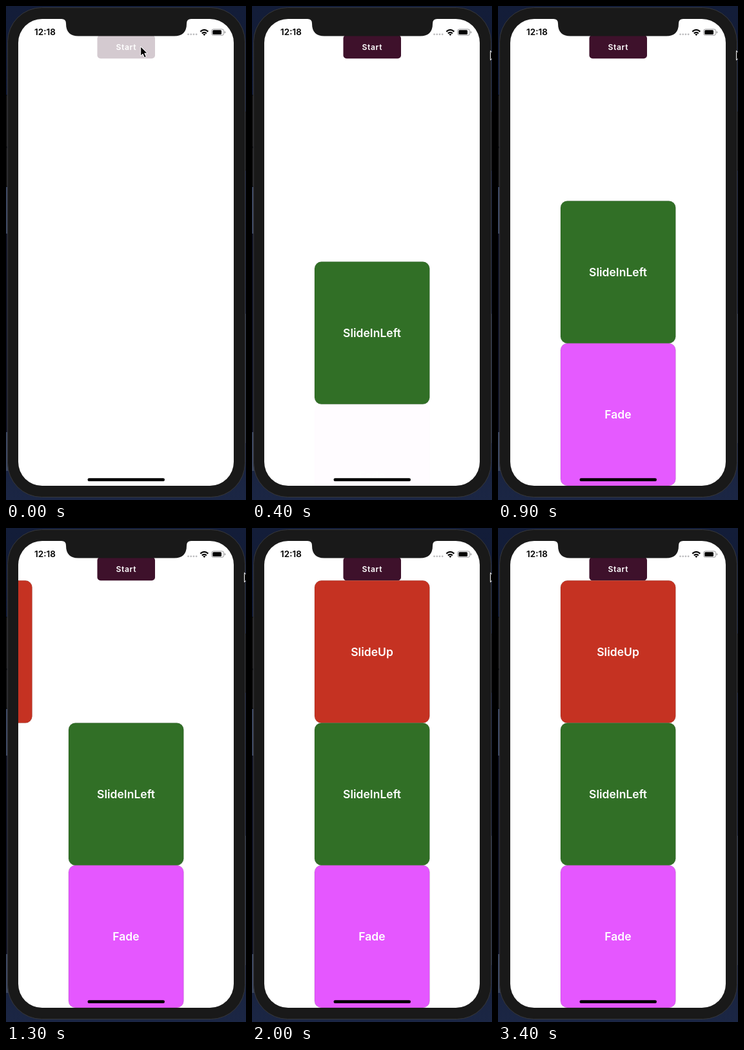
An HTML page for the animation above (3.5 s loop, 372 by 764 pixels).

```html
<!DOCTYPE html>
<html lang="en">
<head>
<meta charset="utf-8">
<title>Sequenced entrances</title>
<style>
  html, body { margin: 0; width: 100%; height: 100%; overflow: hidden; background: #131c35; }
  svg { display: block; width: 372px; height: 764px; }
  text { font-family: Inter, "Liberation Sans", sans-serif; font-weight: 600; text-anchor: middle; fill: #fff; }
  .card rect { stroke: #000; stroke-opacity: .25; stroke-width: .5; }
  .card text { font-size: 17.5px; }
</style>
</head>
<body>
<svg viewBox="0 0 372 764">
  <defs>
    <clipPath id="screenClip"><rect x="19" y="20" width="334" height="722" rx="37"/></clipPath>
    <linearGradient id="sky" x2="0" y2="1">
      <stop stop-color="#131d39"/>
      <stop offset=".6" stop-color="#111830"/>
      <stop offset="1" stop-color="#1b2644"/>
    </linearGradient>
  </defs>

  <rect width="372" height="764" fill="url(#sky)"/>
  <path d="M0 280h4v72h-4zM0 659h4v60h-4z" fill="#3b465f"/>
  <path d="M0 352h4v307h-4z" fill="#111426"/>
  <path d="M368 476h4v200h-4z" fill="#2b3448"/>
  <path d="M0 138h4v80h-4zM0 219h4v60h-4zM368 164h4v90h-4z" fill="#1d1d1e" stroke="#080808"/>
  <rect x="2.5" y="2.5" width="368" height="757" rx="53" fill="#191919" stroke="#37383c"/>

  <g clip-path="url(#screenClip)">
    <rect x="19" y="20" width="334" height="722" fill="#fff"/>
    <g id="button">
      <rect x="141.5" y="45" width="89.5" height="36.3" rx="5" fill="#3e112b"/>
      <text x="186.3" y="67.7" font-size="12.2" letter-spacing=".55">Start</text>
    </g>
    <g id="cards"></g>
  </g>

  <path d="M86 19h201v1q-7 0-7 7q0 19.500-19 19.500h-149q-19 0-19-19.500q0-7-7-7z" fill="#191919"/>
  <text x="60.5" y="45.300" font-size="13.500" style="fill:#000">12:18</text>
  <g fill="#bcbcbe">
    <circle cx="282.500" cy="43.800" r="1.400"/><circle cx="286.700" cy="43.800" r="1.400"/>
    <circle cx="290.900" cy="43.800" r="1.400"/><circle cx="295.100" cy="43.800" r="1.400"/>
  </g>
  <g fill="none" stroke="#000" stroke-width="2.200">
    <path d="M301.300 39.600q6-5.400 12 0"/>
    <path d="M303.800 42.300q3.500-3 7 0"/>
  </g>
  <path d="M305.200 43.700q2.100-1.500 4.200 0l-2.100 2.200z"/>
  <rect x="318.700" y="35.900" width="19" height="9.400" rx="2.800" fill="none" stroke="#8d8d8f" stroke-width=".9"/>
  <rect x="320.200" y="37.300" width="13.800" height="6.600" rx="1.500"/>
  <path d="M338.900 39v3.300q1.300-.4 1.300-1.650t-1.300-1.650z" fill="#8d8d8f"/>
  <rect x="126.500" y="730.300" width="119.500" height="4.700" rx="2.350"/>

  <path id="cursor" d="M0 0V14.500L3.300 11.400L5.900 17.100L8.600 15.900L6.100 10.400H10.500Z" fill="#000" stroke="#fff" stroke-linejoin="round"/>
</svg>

<script>
const LOOP = 3500, STEP = 100;
const $ = id => document.getElementById(id);

function addCard(label, color, y) {
  const card = document.createElementNS("http://www.w3.org/2000/svg", "g");
  card.setAttribute("class", "card");
  card.innerHTML = `<rect x="97" y="${y}" width="178.300" height="220.200" rx="10.500" fill="${color}"/>
    <text x="186" y="${y + 116.700}">${label}</text>`;
  $("cards").append(card);
  return card;
}

const red = addCard("SlideUp", "#c53222", 81.300);
const green = addCard("SlideInLeft", "#316f26", 301.500);
const pink = addCard("Fade", "#e557ff", 521.700);

const progress = (t, start, end) => Math.min(1, Math.max(0, (t - start) / (end - start)));
const easeInOut = p => p < .5 ? 2 * p * p : 1 - 2 * (1 - p) ** 2;
const eased = (t, start, end) => easeInOut(progress(t, start, end));
const move = (node, x, y) => node.setAttribute("transform", `translate(${x.toFixed(2)} ${y.toFixed(2)})`);

function draw(t) {
  $("button").setAttribute("opacity", .22 + .78 * eased(t, 0, 300));

  const glide = eased(t, 50, 400);
  move($("cursor"), 208.700 + 160.800 * glide, 62.700 + 6.500 * glide);
  $("cursor").setAttribute("visibility", t < 2700 ? "visible" : "hidden");

  const drop = 441 * (1 - eased(t, 198, 498));
  move(green, 0, drop);
  move(pink, 0, drop);
  pink.setAttribute("opacity", t < 400 ? 0 : .02 + .98 * eased(t, 400, 960));

  move(red, -276 * (1 - eased(t, 1218, 1518)), 0);
}

function tick() {
  draw(Math.floor((performance.now() + 1) / STEP) * STEP % LOOP);
  requestAnimationFrame(tick);
}
tick();
</script>
</body>
</html>
```
